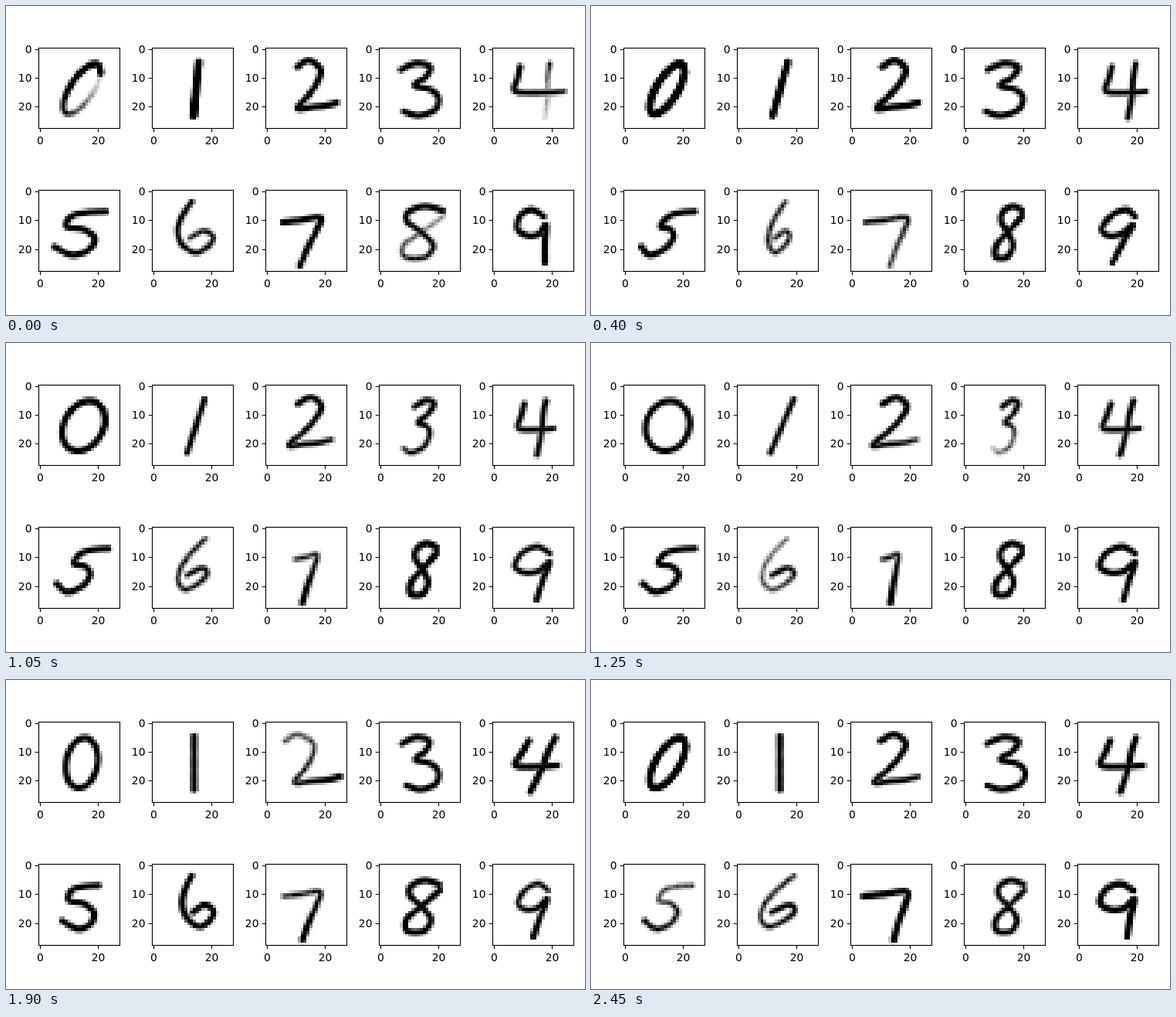
Write an HTML page with a canvas that moves like this. It is 750 px wide and 400 px high and loops after 2.5 s.

```html
<!DOCTYPE html>
<html lang="en">
<head>
<meta charset="utf-8">
<title>Morphing handwritten digits</title>
<style>
html, body { margin: 0; width: 100%; height: 100%; overflow: hidden; background: #fff; }
canvas { display: block; }
</style>
</head>
<body>
<canvas width="750" height="400"></canvas>
<script>
const ctx = document.querySelector('canvas').getContext('2d');
const LOOP = 2500, STEP = 50, CELLS = 28, SIZE = 105;
const poseTimes = [0, 400, 800, 1250, 1550, 1900, 2450];
const rows = [{ top: 54.5, height: 104 }, { top: 238.5, height: 105 }];
const digits = [];

// Pen strokes around x = 0, then poses: centre, slant, width, first ink, last ink.
function digit(path, ...poses) {
  const strokes = path.split(' / ').map(s => s.split(' ').map(p => p.split(',').map(Number)));
  digits.push({ strokes, poses: poses.map(([c, s, w, ink = 1, end = ink]) => [c, s, w, ink, end]) });
}

const oval = Array.from({ length: 12 }, (_, i) => {
  const a = -0.7 - i * Math.PI / 5.5;
  return `${Math.cos(a)},${13.7 + 8.7 * Math.sin(a)}`;
}).join(' ');

digit(oval,
  [14.2, 0.52, 4.6, 1.2, 0.1], [14.3, 0.5, 4.2, 1.5], [15.3, 0.4, 6.6, 1.2],
  [14.6, 0.1, 7.6], [14.8, 0.12, 6.8], [14.3, 0.12, 5.5], [14.5, 0.48, 4.6, 1.3]);
digit('0,4.5 0,14 0,23',
  [14.6, 0.1, 1, 1.5], [14.2, 0.28, 1, 1.3], [14, 0.19, 1],
  [14.8, 0.43, 1, 0.9], [14.3, 0.48, 1, 0.9], [13.9, 0, 1], [14.2, 0, 1]);
digit('-4.5,6 0,3.8 4,6.5 3,10.5 -1,15.5 -6,20.5 0,20 5,19.5 9,18.5',
  [15.3, -0.1, 0.91], [14.3, 0.03, 0.94, 1.1], [14, 0.08, 0.92, 0.9],
  [13.8, 0.14, 0.98, 1, 0.7], [14.3, 0.08, 0.89, 0.7, 0.4], [13.8, -0.34, 1.08, 0.6, 1.1], [13.9, 0.05, 1, 1, 0.8]);
digit('-4.5,7 0,4.8 4,6 2.5,9.5 -1,12.5 3.5,14 5.5,17 4,21 -1,23 -5,21.5',
  [13.1, -0.11, 1.19], [13.1, 0, 1.22], [12.7, 0.28, 0.93, 1, 1.2],
  [14, 0.2, 0.6, 0.9, 0.3], [13.7, 0.13, 0.74, 1, 0.5], [13.4, -0.15, 1.11], [13.4, -0.05, 1.26]);
digit('-5,6 -6,10 -7,14.5 0,15 6,14.5 / 3,5 2,10 1.5,16 0,23.8',
  [16.3, -0.12, 1.29, 1, 0.2], [16.6, -0.02, 1.04, 0.9], [14.8, -0.08, 0.9, 0.9],
  [15, 0.09, 0.96, 0.9], [15.3, 0.3, 0.83, 0.9], [15.2, 0.28, 1.1, 1.1], [15.3, 0.11, 1.11]);
digit('10,6.8 4,7.2 -1,8.5 -3,12 2,13 5,16 2.5,20 -3,21.8 -8,19',
  [12.8, -0.19, 1.11], [13.6, 0.4, 0.75], [13, 0.4, 0.7],
  [14, 0.12, 0.92], [13.9, 0.24, 0.84, 1.2], [13.3, -0.3, 0.9], [13.9, 0.08, 0.85, 0.6, 0.9]);
digit('1,3.5 -2,8 -4,13 -3.5,18 0,21 4,18.5 5.5,15.5 3,13.5 -1,16',
  [13.4, -0.15, 1.25, 0.9, 0.7], [13.6, 0.16, 0.76, 0.7], [13.5, 0.47, 0.86, 1, 0.7],
  [13.1, 0.22, 1.14, 0.5, 0.9], [13.8, 0.14, 0.73], [14.3, -0.22, 1.07], [13.4, 0.42, 1.2, 0.7, 0.9]);
digit('-8,10.5 -2,9.8 5,9 4,14 2,19 0,25.5',
  [12.8, 0.13, 0.97], [13.2, 0.02, 1.1, 0.8, 0.6], [13.9, 0.27, 0.72, 0.6, 1.1],
  [13.6, 0.04, 0.4, 0.7, 1.1], [13.6, -0.18, 0.56, 0.7, 1.2], [13.1, 0.08, 0.93, 0.7, 1.1], [13.4, -0.08, 1.16, 1.1]);
digit('5,6.5 1.5,5 -2,7 -2.5,10.3 0,14 2,18.5 0,22.5 -4,22.5 -4,18.5 0,14 5,8.5',
  [14, -0.15, 1.7, 1, 0.4], [14.5, 0.03, 0.95], [14.2, 0, 0.95, 1.2],
  [14.5, 0, 1], [14.7, 0, 1, 0.95], [14, -0.1, 1.4], [14.8, -0.1, 1.2, 0.9]);
digit('5,8.5 1,6.2 -4,8.2 -6.5,12.8 -3,15.2 1.5,14.5 5,11.5 3,17.5 1,24.5',
  [14, -0.25, 0.88], [13.3, 0.26, 0.9], [13.6, 0.08, 1, 0.7, 1],
  [14, -0.02, 1.07], [13.8, 0, 0.99, 0.9, 1], [13.7, 0.1, 0.86, 0.8, 1], [14.1, -0.13, 1.04, 1.1]);

const clamp = v => Math.min(1, Math.max(0, v));
const noise = (a, b) => { const s = Math.sin(a * 12.99 + b * 78.23) * 43758.5; return s - Math.floor(s); };

function poseStrokes({ strokes, poses }, time) {
  let i = 0;
  while (i < poseTimes.length - 2 && time >= poseTimes[i + 1]) i++;
  const k = (time - poseTimes[i]) / (poseTimes[i + 1] - poseTimes[i]);
  const [centre, slant, width, ink, end] = poses[i].map((v, n) => v + (poses[i + 1][n] - v) * k);
  const last = strokes.flat().length - 1;
  let n = 0;
  return strokes.map(stroke => stroke.map(([x, y]) =>
    [centre + width * x + slant * (14 - y), y, ink + (end - ink) * (n++ / last) ** 2]));
}

// Catmull-Rom samples along a stroke
function sample(points) {
  const at = i => points[Math.max(0, Math.min(points.length - 1, i))];
  const samples = [at(0)];
  for (let i = 0; i < points.length - 1; i++) {
    for (let j = 1; j <= 12; j++) {
      const t = j / 12;
      samples.push([0, 1, 2].map(n => {
        const [a, b, c, d] = [at(i - 1)[n], at(i)[n], at(i + 1)[n], at(i + 2)[n]];
        return b + t / 2 * (c - a + t * (2 * a - 5 * b + 4 * c - d + t * (3 * (b - c) + d - a)));
      }));
    }
  }
  return samples;
}

function rasterize(strokes, seed) {
  const cells = new Float32Array(CELLS * CELLS);
  for (const [x, y, ink] of strokes.flatMap(sample)) {
    const reach = 1.3 + 0.3 * ink;
    for (let r = Math.max(0, Math.ceil(y - reach)); r <= Math.min(CELLS - 1, y + reach); r++) {
      for (let c = Math.max(0, Math.ceil(x - reach)); c <= Math.min(CELLS - 1, x + reach); c++) {
        const grain = 1 - clamp(1 - ink) * 0.6 * noise(c + seed, r);
        const shade = clamp(ink * (reach - Math.hypot(c - x, r - y)) * grain);
        cells[r * CELLS + c] = Math.max(cells[r * CELLS + c], shade);
      }
    }
  }
  return cells;
}

function drawCells(cells, left, { top, height }) {
  const px = c => Math.round(left + c * SIZE / CELLS);
  const py = r => Math.round(top + r * height / CELLS);
  cells.forEach((shade, i) => {
    if (shade < 0.02) return;
    const c = i % CELLS, r = Math.floor(i / CELLS), g = Math.round(255 * (1 - shade));
    ctx.fillStyle = `rgb(${g},${g},${g})`;
    ctx.fillRect(px(c), py(r), px(c + 1) - px(c), py(r + 1) - py(r));
  });
}

function drawAxes(left, { top, height }) {
  const bottom = top + height;
  ctx.fillStyle = ctx.strokeStyle = '#000';
  ctx.lineWidth = 1.11;
  ctx.font = '13.89px "DejaVu Sans", sans-serif';
  ctx.strokeRect(left, top, SIZE, height);
  ctx.beginPath();
  for (const value of [0, 10, 20]) {
    const y = top + (value + 0.5) * height / CELLS, lineY = Math.floor(y) + 0.5;
    ctx.moveTo(left - 4.86, lineY);
    ctx.lineTo(left, lineY);
    ctx.textAlign = 'right';
    ctx.fillText(value, left - 9, Math.floor(y + 5));
    if (value === 10) continue;
    const x = Math.floor(left + (value + 0.5) * SIZE / CELLS) + 0.5;
    ctx.moveTo(x, bottom);
    ctx.lineTo(x, bottom + 4.86);
    ctx.textAlign = 'center';
    ctx.fillText(value, x, Math.floor(bottom + 20.5));
  }
  ctx.stroke();
}

function draw() {
  const time = Math.floor(performance.now() % LOOP / STEP) * STEP;
  ctx.fillStyle = '#fff';
  ctx.fillRect(0, 0, 750, 400);
  digits.forEach((shape, i) => {
    const left = 42.5 + 147 * (i % 5), row = rows[Math.floor(i / 5)];
    drawCells(rasterize(poseStrokes(shape, time), i * 31), left, row);
    drawAxes(left, row);
  });
  requestAnimationFrame(draw);
}
draw();
</script>
</body>
</html>
```
